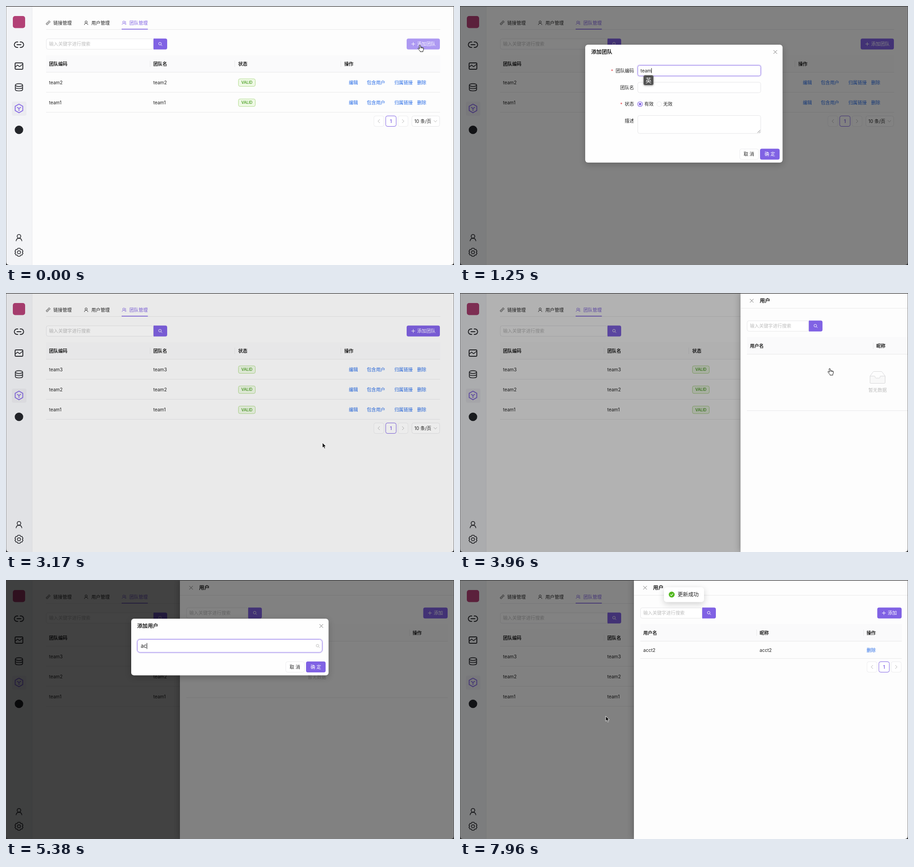
These frames come from a looping animation (984 by 569 pixels, 8 s). An HTML page with a canvas:

```html
<!DOCTYPE html>
<html lang="zh">
<head>
<meta charset="utf-8">
<title>团队管理</title>
<style>
html, body { margin: 0; width: 100%; height: 100%; overflow: hidden; background: #fdfdfd; }
canvas { display: block; width: 984px; height: 569px; }
</style>
</head>
<body>
<canvas id="stage"></canvas>
<script>
const W = 984, H = 569, LOOP = 8000;
const FONT = 'Inter, "Noto Sans CJK SC", "Noto Sans CJK", "Noto Sans", sans-serif';
const PURPLE = '#8062e4', LIGHT = '#ad99f2', INK = '#222', GREY = '#bdbdbd', LINE = '#e9e9ea', BLUE = '#2369e6';
const MASK = 0.49;
const USERS = ['acct1', 'acct2'];
const canvas = document.getElementById('stage'), c = canvas.getContext('2d');
const ratio = window.devicePixelRatio || 1;
canvas.width = W * ratio;
canvas.height = H * ratio;

// timing
const span = (t, a, b) => Math.min(1, Math.max(0, (t - a) / (b - a)));
const easeOut = p => 1 - (1 - p) ** 3;
const easeInOut = p => p * p * (3 - 2 * p);
const typed = (s, t, start, step) => t < start ? '' : s.slice(0, Math.floor((t - start) / step) + 1);

// drawing helpers
function text(s, x, y, o = {}) {
  const size = o.size || 10.1;
  c.font = `${o.weight || 400} ${size}px ${FONT}`;
  c.textAlign = o.align || 'left';
  c.fillStyle = o.color || INK;
  c.fillText(s, x, y + size * 0.37);
  return c.measureText(s).width;
}
function box(x, y, w, h, r, fill, stroke, lw = 1) {
  c.beginPath();
  c.roundRect(x, y, w, h, r);
  if (fill) { c.fillStyle = fill; c.fill(); }
  if (stroke) { c.strokeStyle = stroke; c.lineWidth = lw; c.stroke(); }
}
function line(color, lw, ...pts) {
  c.beginPath();
  for (let i = 0; i < pts.length; i += 2) c.lineTo(pts[i], pts[i + 1]);
  c.strokeStyle = color;
  c.lineWidth = lw;
  c.stroke();
}
function ring(x, y, r, color, lw = 1, a = 0, b = Math.PI * 2) {
  c.beginPath();
  c.arc(x, y, r, a, b);
  c.strokeStyle = color;
  c.lineWidth = lw;
  c.stroke();
}
function disc(x, y, r, color) {
  c.beginPath();
  c.arc(x, y, r, 0, Math.PI * 2);
  c.fillStyle = color;
  c.fill();
}
function path(d, color, lw, fill) {
  const p = new Path2D(d);
  if (fill) { c.fillStyle = fill; c.fill(p); }
  c.strokeStyle = color;
  c.lineWidth = lw;
  c.stroke(p);
}
function at(x, y, draw, scale = 1) {
  c.save();
  c.translate(x, y);
  c.scale(scale, scale);
  draw();
  c.restore();
}
function shadow(blur, y, alpha, draw) {
  c.save();
  c.shadowColor = `rgba(0,0,0,${alpha})`;
  c.shadowBlur = blur * ratio;
  c.shadowOffsetY = y * ratio;
  draw();
  c.restore();
}
function dim(alpha) {
  c.fillStyle = `rgba(0,0,0,${alpha})`;
  c.fillRect(0, 0, W, H);
}

// icons
function person(x, y, s, color, lw) {
  at(x, y, () => {
    ring(0, -3, 4, color, lw);
    path('M-6.4 7.5C-6 3.4-3.5 1.4 0 1.4S6 3.4 6.4 7.5', color, lw);
  }, s);
}
function hexagon(r, color, lw) {
  const pts = [];
  for (let i = 0; i <= 6; i++) pts.push(r * Math.sin(i * Math.PI / 3), -r * Math.cos(i * Math.PI / 3));
  line(color, lw, ...pts);
}
function search(x, y, color) {
  ring(x - 0.8, y - 0.8, 2.9, color, 1);
  line(color, 1, x + 1.4, y + 1.4, x + 4, y + 4);
}
function cross(x, y, r, color, lw = 1) {
  line(color, lw, x - r, y - r, x + r, y + r);
  line(color, lw, x - r, y + r, x + r, y - r);
}
function plus(x, y) {
  line('#fff', 1, x - 4, y, x + 4, y);
  line('#fff', 1, x, y - 4, x, y + 4);
}

// widgets
function field(x, y, w, h, focus, r = 4) {
  if (focus) box(x - 0.5, y - 0.5, w + 1, h + 1, r + 1, null, 'rgba(128,98,228,.16)', 3);
  box(x + 0.5, y + 0.5, w - 1, h - 1, r, '#fff', focus ? '#957deb' : '#e6e6e8');
}
function searchBar(x, y, w) {
  field(x, y, w, 24, false);
  text('输入关键字进行搜索', x + 6.5, y + 12, { color: GREY });
  box(x + w, y, 30, 24, [0, 4, 4, 0], PURPLE);
  search(x + w + 15, y + 12, '#fff');
}
function addButton(x, y, w, label, fill) {
  box(x, y, w, 24, 4, fill);
  plus(x + 14.5, y + 12);
  text(label, x + 23, y + 12, { color: '#fff' });
}
function tableHead(x, y, w, cols, bars) {
  c.fillStyle = '#fafafb';
  c.fillRect(x, y, w, 37);
  cols.forEach(([s, cx]) => text(s, cx, y + 19, { weight: 600 }));
  bars.forEach(bx => line(LINE, 1, bx, y + 12, bx, y + 26));
  rule(x, y + 37.5, w);
}
const rule = (x, y, w) => line(LINE, 1, x, y, x + w, y);
function pager(x, y) {
  [0, 53].forEach((dx, i) => {
    box(x + dx + 0.5, y - 11.5, 22, 23, 4, '#fff', '#ececee');
    const d = i ? 2 : -2, m = x + dx + 11.5;
    line('#b5b5b5', 1, m - d, y - 4, m + d, y, m - d, y + 4);
  });
  box(x + 26.5, y - 11.5, 23, 23, 4, '#fff', PURPLE);
  text('1', x + 38, y, { align: 'center', weight: 600, color: PURPLE });
}
function footer(y, hover) {
  box(614.5, y - 11.5, 41, 23, 4, '#fff', '#ececee');
  text('取 消', 634.5, y, { align: 'center' });
  box(659, y - 12, 43, 24, 4, hover ? '#937ae9' : PURPLE);
  text('确 定', 680.5, y, { align: 'center', color: '#fff' });
}
const caret = (x, y, h) => line('#111', 1, x, y - h / 2, x, y + h / 2);

// scenes
function sidebar() {
  c.fillStyle = '#f3f4f7';
  c.fillRect(0, 0, 57, H);
  line('#ebebee', 1, 57.5, 0, 57.5, H);
  box(13, 210, 32, 31, 4, '#ebebf0');
  box(15, 22, 27, 26.5, 5, '#b24176');
  const dark = '#2b2c31', lw = 1.9;
  at(28.5, 85, () => {
    path('M-2-6H-4.2A6 6 0 0 0-4.2 6H-2M2-6H4.2A6 6 0 0 1 4.2 6H2M-5 0H5', dark, lw);
  });
  at(28.5, 132, () => {
    box(-8.5, -7, 17, 14, 2, null, dark, lw);
    path('M-8 2L-3.5-1.7Q-2.5-2.2-1.5-1L.5 .8Q1.3 1.5 2.3.7L8-4', dark, 1.6);
  });
  at(28.5, 178.5, () => {
    c.beginPath();
    c.ellipse(0, -4.8, 8, 3.1, 0, 0, Math.PI * 2);
    c.strokeStyle = dark;
    c.lineWidth = 1.7;
    c.stroke();
    path('M-8-4.8V5C-8 9 8 9 8 5V-4.8M-8 0C-8 4 8 4 8 0', dark, 1.7);
  });
  at(28.5, 225, () => {
    hexagon(9.6, PURPLE, 1.7);
    path('M-4.5-2.6L0 0L4.5-2.6M0 0V5.4', PURPLE, 1.6);
  });
  disc(28.5, 272, 9.3, '#24262b');
  person(28.5, 509, 1, dark, 1.6);
  at(28.5, 541, () => {
    path('M-2.3-8.8H2.3L3.7-6.3H6.5L8.8-2.2L7.4 0L8.8 2.2L6.5 6.3H3.7L2.3 8.8H-2.3L-3.7 6.3H-6.5L-8.8 2.2L-7.4 0L-8.8-2.2L-6.5-6.3H-3.7Z', dark, 1.6);
    ring(0, 0, 3.3, dark, 1.5);
  });
}
function tabs() {
  rule(88, 51.5, 866);
  at(92.5, 37, () => {
    c.rotate(Math.PI / 4);
    box(-2, -5, 4, 4.4, 2, null, INK, 0.9);
    box(-2, 0.8, 4, 4.2, 2, null, INK, 0.9);
  });
  text('链接管理', 104, 37);
  person(176, 37, 0.6, INK, 1.6);
  text('用户管理', 187.5, 37);
  person(258.6, 37, 0.56, PURPLE, 1.6);
  path('M261.5 33.2a2.4 2.4 0 0 1 .3 4.3q1.8.8 2.2 3', PURPLE, 0.9);
  text('团队管理', 271, 37, { color: PURPLE });
  c.fillStyle = PURPLE;
  c.fillRect(254, 50, 57.5, 1.6);
}
function teamPage(rows, hover) {
  c.fillStyle = '#fdfdfd';
  c.fillRect(0, 0, W, H);
  sidebar();
  tabs();
  searchBar(88, 71.5, 236);
  addButton(880, 71.5, 73, '添加团队', hover ? LIGHT : PURPLE);
  tableHead(88, 108, 865.5, [['团队编码', 94.5], ['团队名', 323.5], ['状态', 510], ['操作', 743]], [316.5, 502.5, 735.5]);
  rows.forEach((name, i) => {
    const y = 168 + i * 44.2;
    text(name, 94.5, y);
    text(name, 323.5, y);
    box(510.5, y - 8, 37, 16.5, 3.5, '#eff9e6', '#b3dd90');
    text('VALID', 529, y + 0.2, { size: 8.3, weight: 600, color: '#55a52f', align: 'center' });
    [['编辑', 753], ['包含用户', 792.5], ['归属链接', 853], ['删除', 903]].forEach(([s, x]) => text(s, x, y, { color: BLUE }));
    rule(88, Math.round(y + 22) - 0.5, 865.5);
  });
  const y = 253 + (rows.length - 2) * 44;
  pager(807.5, y);
  box(891.5, y - 11.5, 61, 23, 4, '#fff', '#e6e6e8');
  text('10 条/页', 897, y);
  line(GREY, 1, 939.5, y - 2, 943, y + 2, 946.5, y - 2);
}
function panel(h, title) {
  shadow(14, 4, 0.22, () => box(275, 85, 433.5, h, 6, '#fefefe'));
  text(title, 288, 101, { size: 11.6, weight: 600 });
  cross(692.5, 101, 4, '#777');
}
function teamForm(t) {
  panel(259, '添加团队');
  const second = t >= 1630, y = second ? 179 : 142;
  const code = typed('team3', t, 860, 105), name = typed('team3', t, 1720, 85);
  [['团队编码', 142, 1], ['团队名', 179, 0], ['状态', 215.5, 1], ['描述', 252.5, 0]].forEach(([s, ly, must]) => {
    const w = text(s, 382, ly, { align: 'right' });
    if (must) text('*', 377 - w, ly + 1, { align: 'right', color: '#e5484d' });
  });
  field(390, 130, 271, 24, t > 700 && !second);
  field(390, 167, 271, 24, second);
  field(390, 240, 271, 40.5, false);
  line('#777', 1, 653.5, 278.5, 659.5, 272.5);
  line('#777', 1, 657, 278.5, 659.5, 276);
  ring(395.5, 215.5, 5.3, PURPLE, 1.1);
  disc(395.5, 215.5, 2.7, PURPLE);
  text('有效', 405, 215.5);
  ring(437.5, 215.5, 5.2, '#e9e9eb');
  text('无效', 446.5, 215.5);
  const w1 = text(code, 396.5, 142), w2 = text(name, 396.5, 179);
  if (t > 700) caret(397 + (second ? w2 : w1), y, 11);
  footer(325.5, t > 2560);
  const tip = span(t, 720, 800) * (1 - span(t, 1480, 1600));
  if (tip) {
    c.save();
    c.globalAlpha *= tip;
    shadow(4, 1, 0.35, () => box(403, 152, 22, 22, 4, '#505050'));
    box(403.5, 152.5, 21, 21, 4, null, '#747474');
    text('英', 414, 163, { size: 13, color: '#fff', align: 'center' });
    c.restore();
  }
}
function userForm(t) {
  panel(124.5, '添加用户');
  field(288, 130, 407, 29.5, t > 5150, 6);
  search(685, 145, GREY);
  const picked = t >= 6560, big = { size: 11.5 };
  if (picked) {
    c.font = `11.5px ${FONT}`;
    const w = c.measureText(USERS[1]).width;
    box(292, 133.5, w + 15, 22.5, 4, '#efeff0');
    text(USERS[1], 296, 144.5, big);
    cross(296 + w + 5.5, 145, 2.3, '#777', 0.9);
    caret(292 + w + 18, 145, 13);
  } else {
    const w = text(typed(USERS[0].slice(0, 4), t, 5240, 110), 296, 145, big);
    if (t > 5150) caret(296.5 + w, 145, 13);
  }
  footer(191, t > 7420);
  const open = span(t, 5880, 6020) * (1 - span(t, 7300, 7400));
  if (open) dropdown(open, picked, t);
}
function dropdown(open, picked, t) {
  c.save();
  c.globalAlpha *= open;
  c.translate(0, 162);
  c.scale(1, 0.8 + 0.2 * open);
  c.translate(0, -162);
  shadow(12, 4, 0.25, () => box(288, 162.5, 407, 53.5, 6, '#fefefe'));
  if (picked) box(291, 189.5, 401, 23.5, 3, '#efebfb');
  else box(291, t < 6280 ? 166 : 189.5, 401, 23.5, 3, '#f4f4f5');
  text(USERS[0], 301.5, 178);
  text(USERS[1], 301.5, 201.3, { weight: picked ? 600 : 400 });
  if (picked) line(PURPLE, 1.2, 672.5, 201.5, 675.5, 204.5, 681, 197.5);
  c.restore();
}
function drawer(p, filled) {
  c.save();
  c.translate((1 - p) * 602, 0);
  shadow(14, 0, 0.3, () => { c.fillStyle = '#fdfdfd'; c.fillRect(382, 0, 602, H); });
  cross(406.5, 17, 4, '#777');
  text('用户', 424, 17, { size: 11.6, weight: 600 });
  rule(382, 33.5, 602);
  searchBar(396, 60.5, 136);
  addButton(916.5, 60.5, 53.5, '添加', PURPLE);
  const nick = filled ? 658 : 680;
  tableHead(396, 97, 574.5, [['用户名', 402.5], ['昵称', nick], ['操作', 893]], [nick - 6.5, 886.5]);
  if (filled) {
    text(USERS[1], 402.5, 154);
    text(USERS[1], 658, 154);
    text('删除', 893, 154, { color: BLUE });
    rule(396, 172.5, 574.5);
    pager(893.5, 191);
  } else {
    path('M666.5 182.5L673 173.5Q674 172.5 675 172.5H691Q692 172.5 693 173.5L699.5 182.5V196.5Q699.5 198.5 697.5 198.5H668.5Q666.5 198.5 666.5 196.5Z', '#d9d9db', 1, '#fdfdfd');
    path('M666.5 182.5H676Q677.5 182.5 677.5 184.5T680 187H686Q688.5 187 688.5 184.5T690 182.5H699.5V196.5Q699.5 198.5 697.5 198.5H668.5Q666.5 198.5 666.5 196.5Z', '#d9d9db', 1, '#f8f8f8');
    text('暂无数据', 683, 213, { color: GREY, align: 'center' });
    rule(396, 258.5, 574.5);
  }
  c.restore();
}
function toast(p) {
  if (!p) return;
  c.save();
  c.globalAlpha = p;
  c.translate(0, (p - 1) * 30);
  shadow(14, 4, 0.18, () => box(448, 16, 88, 32.5, 6, '#fff'));
  disc(465, 32, 6.5, '#52b81f');
  line('#fff', 1.2, 462, 32, 464.3, 34.3, 468, 29.8);
  text('更新成功', 478, 32, { size: 11.6 });
  c.restore();
}

// dialog that grows out of the clicked button
function popup(t, from, until, ox, oy, draw) {
  const show = easeOut(span(t, from, from + 220)), hide = span(t, until, until + 150);
  const shade = show * (1 - easeInOut(span(t, until, until + 200)));
  if (!shade) return;
  dim(MASK * shade);
  const p = show * (1 - easeInOut(hide));
  if (!p) return;
  c.save();
  c.globalAlpha = p;
  at(ox, oy, () => { c.translate(-ox, -oy); draw(t); }, 0.2 + 0.8 * p);
  c.restore();
}

// pointer: time, x, y, shape from then on
const MOVES = [
  [0, 909, 86, 'hand'], [260, 909, 86, 'arrow'], [640, 520, 142, 'beam'], [840, 520, 142, ''],
  [1480, 520, 142, 'beam'], [1620, 520, 179, 'beam'], [1700, 520, 179, ''], [2150, 520, 179, 'beam'],
  [2250, 520, 179, 'arrow'], [2580, 680, 322, 'hand'], [2980, 680, 322, 'arrow'], [3160, 695, 329, 'arrow'],
  [3300, 695, 329, 'arrow'], [3650, 812, 166, 'hand'], [3980, 812, 166, 'arrow'], [4410, 828, 69, 'arrow'],
  [4480, 828, 69, 'arrow'], [4680, 942, 70, 'hand'], [4860, 942, 70, 'arrow'], [5080, 500, 143, 'beam'],
  [5220, 500, 143, ''], [5950, 500, 143, 'arrow'], [6300, 400, 198, 'hand'], [6640, 400, 198, 'hand'],
  [7150, 609, 163, 'hand'], [7290, 609, 163, 'arrow'], [7460, 681, 188, 'hand'], [7620, 681, 188, 'arrow'],
  [7900, 320, 299, 'arrow']
];
const SHAPES = {
  arrow: () => path('M0 0V11.2L2.6 8.8L4.4 13L6.4 12.1L4.6 8.1H8Z', '#fff', 0.9, '#0a0a0a'),
  hand: () => path('M-1.3 1.2Q-1.2-.3 .1-.1Q1 .1 1.3 1.2L2.1 5Q3.1 3.8 4.3 5Q5.5 4.3 6.3 5.6Q7.8 5.1 8.1 6.8Q8.5 10.5 6.9 12.2V14.4H.7V13.2Q-1.2 11.7-2.2 9.8Q-3.6 8-4 7.2Q-3.8 5.8-2.3 6.5L-.4 8Z M2.1 5L2.5 7M4.3 5L4.7 7M6.3 5.6L6.4 7.3', '#111', 1, '#fff'),
  beam: () => path('M-2.5-6Q0-6 0-4.5Q0-6 2.5-6M0-4.5V4.5M-2.5 6Q0 6 0 4.5Q0 6 2.5 6', '#222', 1)
};
function pointer(t) {
  let i = MOVES.length - 1;
  while (MOVES[i][0] > t) i--;
  const a = MOVES[i], b = MOVES[i + 1] || a;
  const p = a === b ? 0 : easeInOut(span(t, a[0], b[0]));
  if (a[3]) at(a[1] + (b[1] - a[1]) * p, a[2] + (b[2] - a[2]) * p, SHAPES[a[3]]);
}

function windowEdge() {
  c.fillStyle = '#3c3c3e';
  c.fillRect(0, 0, W, 1.3);
  c.fillStyle = 'rgba(60,60,62,.6)';
  c.fillRect(0, 0, 0.7, H);
  c.fillRect(W - 1, 0, 1, H);
  c.fillStyle = '#2c2c2e';
  c.fill(new Path2D('M0 562Q.5 569 7 569H0ZM984 562Q983.5 569 977 569H984Z'));
}

function draw(t) {
  c.setTransform(ratio, 0, 0, ratio, 0, 0);
  teamPage(t < 3060 ? ['team2', 'team1'] : ['team3', 'team2', 'team1'], t < 260);
  popup(t, 180, 3020, 916, 83, teamForm);
  const slide = easeOut(span(t, 3880, 4180));
  if (slide) {
    dim(MASK * slide);
    drawer(slide, t >= 7700);
  }
  popup(t, 4780, 7600, 943, 72, userForm);
  toast(easeOut(span(t, 7680, 7880)));
  windowEdge();
  pointer(t);
}

const start = performance.now();
function tick() {
  draw((performance.now() - start) % LOOP);
  requestAnimationFrame(tick);
}
tick();
</script>
</body>
</html>
```
